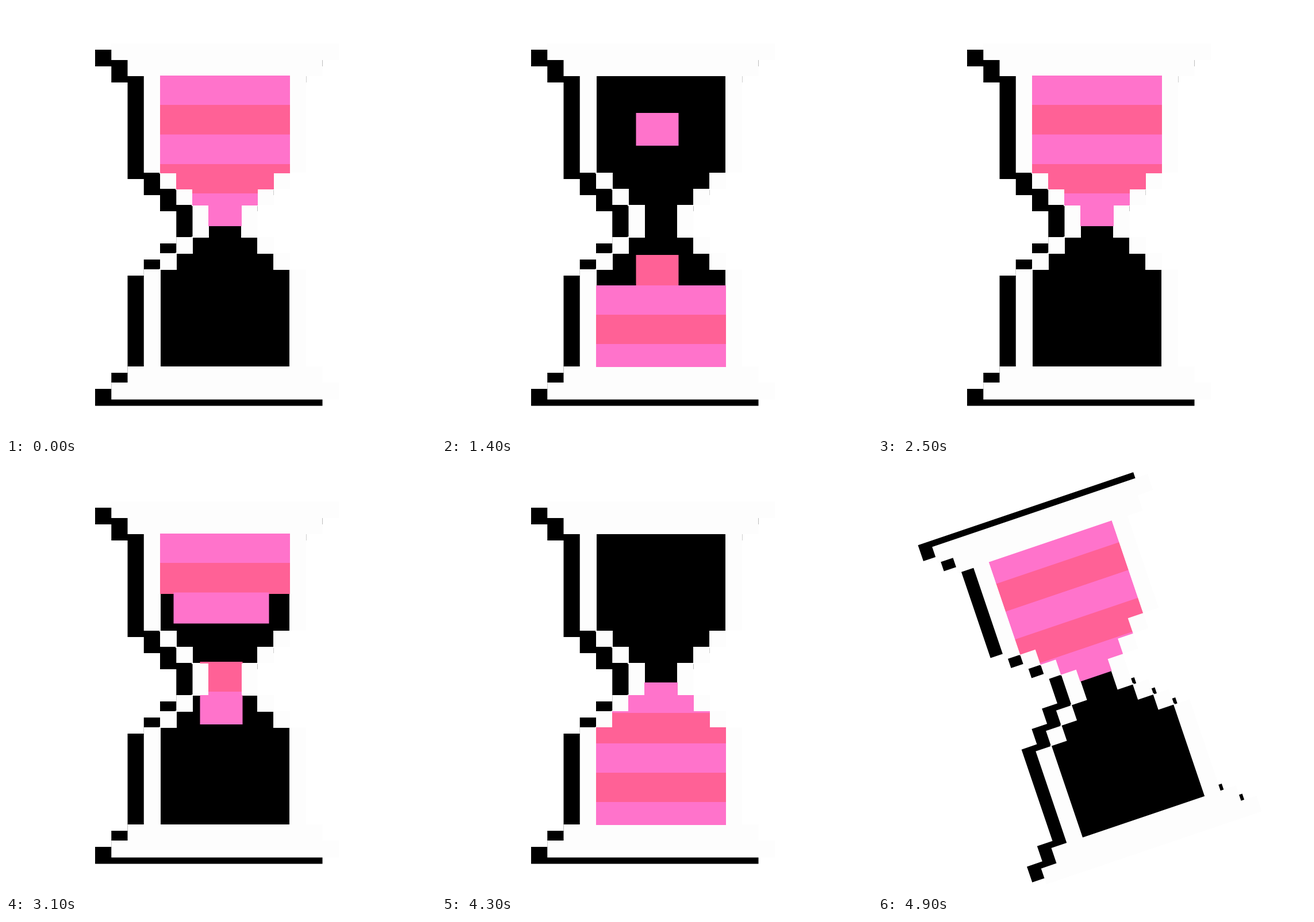
Write an HTML page with a canvas that moves like this. It is 748x748 px and loops after 5.01 s.

```html
<!DOCTYPE html>
<html lang="en">
<head>
<meta charset="utf-8">
<title>Hourglass</title>
<style>
  html, body { margin: 0; width: 100%; height: 100%; overflow: hidden; background: #fff; }
  canvas { display: block; }
</style>
</head>
<body>
<canvas id="stage" width="748" height="748"></canvas>
<script>
const ctx = document.getElementById('stage').getContext('2d');
const CX = 381, CY = 374.5;
const WHITE = '#fdfdfd', PINK = '#ff73cb', RED = '#ff6196';
const LOOP = 5010, CYCLE = 2500, STEP = 100;

// Stepped symmetric outline from row boundaries and half widths
function outline(ys, half) {
  const path = new Path2D();
  half.forEach((h, i) => {
    path.lineTo(CX + h, ys[i]);
    path.lineTo(CX + h, ys[i + 1]);
  });
  for (let i = half.length - 1; i >= 0; i--) {
    path.lineTo(CX - half[i], ys[i + 1]);
    path.lineTo(CX - half[i], ys[i]);
  }
  path.closePath();
  return path;
}

const body = outline([65, 94, 122, 290, 318, 346, 402, 430, 458, 627, 655, 684.5],
                     [7, 6, 5, 4, 3, 2, 3, 4, 5, 6, 7].map(c => 28.25 * c));
const glass = outline([121, 291, 319, 347, 402, 430, 458, 628],
                      [4, 3, 2, 1, 2, 3, 4].map(c => 28 * c + 1));

// Sand bands, listed in the order they fall
const TOP = [326, 275, 223.5, 172, 121];
const QUEUE = [396, 344, 291.5, 239.5, 186];
const FLOOR = [588, 537, 486, 433, 380];
const FULL = [268, 494], WIDE = [291.5, 457.5], NARROW = [337.5, 411.5];

function bandPose(i, phase) {
  const topHeight = i ? 54 : 57;
  // One extra pixel tucks each band under the one below, so no seam shows
  const floorHeight = (i ? FLOOR[i - 1] : 628) - FLOOR[i] + 1;
  if (phase < -2) return [FULL, TOP[i], topHeight];
  if (phase === -2) return [WIDE, TOP[i], topHeight];
  if (phase === -1) return [NARROW, TOP[i], topHeight];
  if (phase < 3) return [NARROW, QUEUE[i], 57];
  if (phase === 3) return [NARROW, (QUEUE[i] + FLOOR[i]) / 2, 52];
  return [[NARROW, WIDE, FULL][Math.min(phase - 4, 2)], FLOOR[i], floorHeight];
}

function drawSand(step) {
  for (let i = 4; i >= 0; i--) {
    const [[left, right], y, height] = bandPose(i, step - 2 * (i + 1));
    ctx.fillStyle = i % 2 ? RED : PINK;
    ctx.fillRect(left, y, right - left, height);
  }
}

function draw(time) {
  const t = time % LOOP;
  const tick = Math.floor((t < CYCLE ? t : t - CYCLE) / STEP);
  const sandStep = Math.min(Math.max(tick - 2, 0), 16);
  const p = Math.min(Math.max(tick - 20, 0), 4) / 5;
  const turn = p * p * (3 - 2 * p);

  ctx.fillStyle = '#fff';
  ctx.fillRect(0, 0, 748, 748);
  ctx.save();
  ctx.translate(CX, CY);
  ctx.rotate(Math.PI * turn);
  ctx.translate(-CX, -CY);

  // The shadow slides across while the glass turns over
  ctx.save();
  ctx.translate(-28.25 * (1 - 2 * turn), 11);
  ctx.fillStyle = '#000';
  ctx.fill(body);
  ctx.restore();

  ctx.fillStyle = WHITE;
  ctx.fill(body);
  ctx.fillStyle = '#000';
  ctx.fill(glass);
  ctx.strokeStyle = WHITE;
  ctx.lineWidth = 2;
  ctx.stroke(glass);
  ctx.clip(glass);
  drawSand(sandStep);
  ctx.restore();
}

const start = performance.now();
function frame() {
  draw(performance.now() - start);
  requestAnimationFrame(frame);
}
frame();
</script>
</body>
</html>
```
